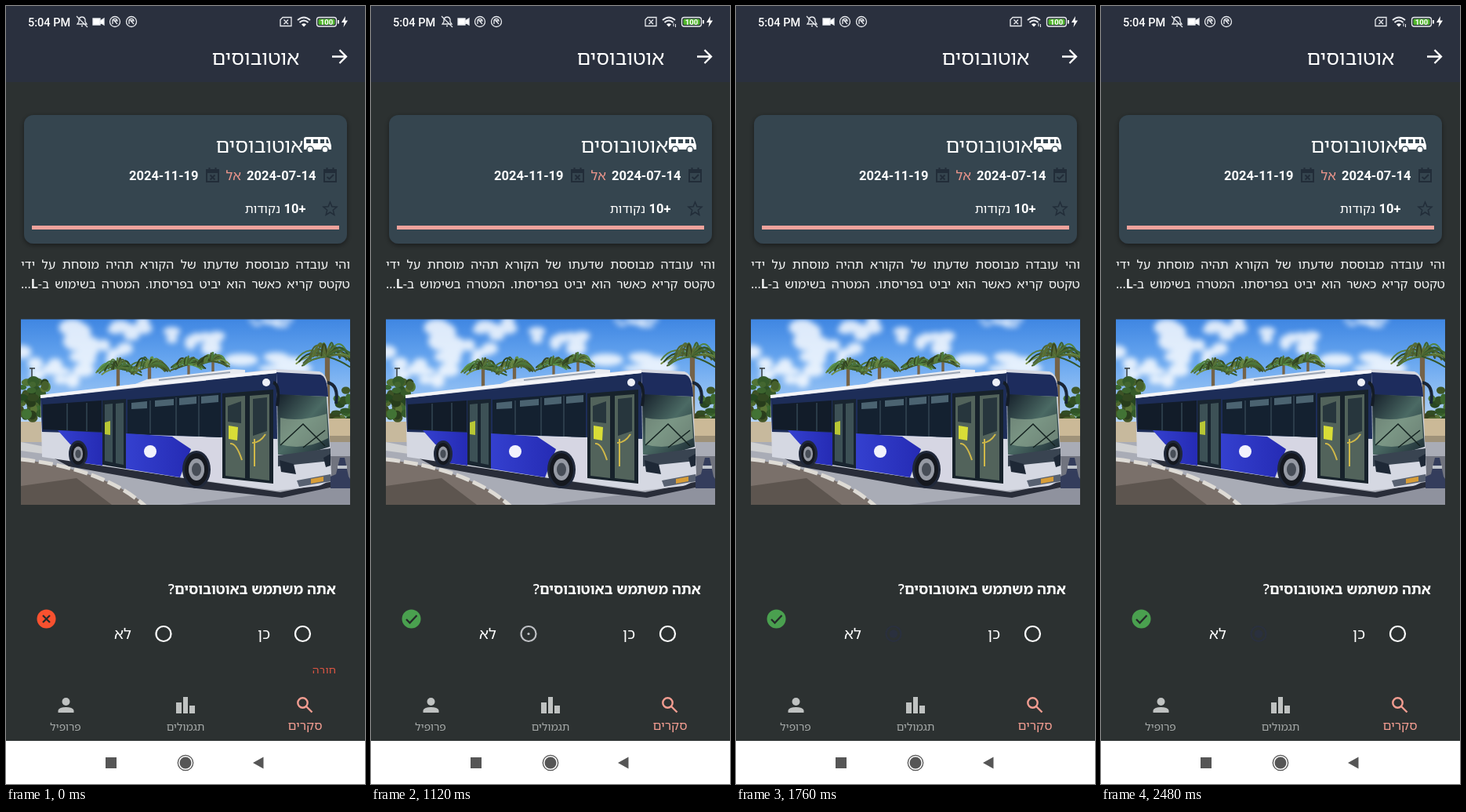
These frames come from a looping animation (458 px wide and 992 px high, 2.56 s). An HTML page:

```html
<!DOCTYPE html>
<html lang="he">
<head>
<meta charset="utf-8">
<style>
html, body { margin: 0; width: 100%; height: 100%; overflow: hidden; background: #2c3131; }
svg { position: absolute; left: 0; top: 0; }
text { font-family: "Noto Sans Hebrew", "Open Sans", "Noto Sans", sans-serif; fill: #fff; }
.he { direction: rtl; }
.mid { text-anchor: middle; }
.num { font-family: Roboto, sans-serif; font-weight: 700; }
.para { position: absolute; left: 19px; width: 420px; top: 317px; direction: rtl; color: #f4f5f5;
  font: 500 16px/25px "Noto Sans Hebrew", "Open Sans", "Noto Sans", sans-serif; }
.para div { white-space: nowrap; text-align: justify; text-align-last: justify; }
</style>
</head>
<body>
<svg width="458" height="992" viewBox="0 0 458 992">
  <defs>
    <linearGradient id="sky" x2="0" y2="1"><stop stop-color="#3f86e2"/><stop offset=".35" stop-color="#6aa8f0"/><stop offset="1" stop-color="#d3e5f8"/></linearGradient>
    <linearGradient id="glass" x2="1" y2="1"><stop stop-color="#16202b"/><stop offset=".5" stop-color="#4b6a64"/><stop offset="1" stop-color="#1b2a33"/></linearGradient>
    <linearGradient id="blue" x2="1"><stop stop-color="#3440cf"/><stop offset="1" stop-color="#252bb4"/></linearGradient>
    <filter id="soft"><feGaussianBlur stdDeviation="3.5"/></filter>
    <filter id="shade" x="-10%" y="-10%" width="120%" height="125%"><feDropShadow dx="0" dy="2" stdDeviation="3" flood-opacity=".45"/></filter>
    <clipPath id="photo"><rect x="19" y="399.5" width="420" height="236.5"/></clipPath>
    <clipPath id="page"><rect width="458" height="851"/></clipPath>
  </defs>

  <!-- status bar and title -->
  <rect width="458" height="97" fill="#2a303e"/>
  <text class="num" x="28" y="25.500" font-size="14.500" style="font-weight:500">5:04 PM</text>
  <g fill="none" stroke="#e8eaee" stroke-width="1.300">
    <path d="M91 23H103L101 20V17Q100 14 97 14Q94 14 93 17V20ZM96 25.500H98M90 13L104 27"/>
    <path d="M111 16H120V24H111ZM120 19L125 16V24L120 21Z" fill="#fff"/>
    <g id="rings"><circle cx="139" cy="20" r="6.500"/><path d="M136 20A3 3 0 0 1 142 19L138 18.500L142 23M136 23V20"/></g>
    <use href="#rings" x="21"/>
    <path d="M353 14.500H364V25.500H350V17.500ZM354.500 17.500L360 23M360 17.500L354.500 23"/>
    <path d="M372 18Q380 11 388 18M374.500 21Q380 16 385.500 21" stroke-width="2"/>
    <path d="M377 23.500Q380 21 383 23.500L380 26.500Z" fill="#fff" stroke="none"/>
    <path id="net" d="M386 22V26M388.500 23V27" stroke-width="1"/>
    <rect x="396.500" y="14.500" width="25" height="11.500" rx="3"/>
    <path d="M424 18V22.500" stroke-width="2"/>
  </g>
  <rect x="398.500" y="16.500" width="21" height="7.500" rx="1.500" fill="#52b72e"/>
  <text class="num mid" x="409" y="23.800" font-size="9.500">100</text>
  <path d="M433 13L428 21H431.500L430.500 27L436 18.500H432.500Z" fill="#fff"/>
  <text class="he" x="374.500" y="75" font-size="26">אוטובוסים</text>
  <path d="M416 64.500H433M425.500 56L434 64.500L425.500 73" fill="none" stroke="#fff" stroke-width="2.300"/>

  <!-- card -->
  <rect x="23" y="139" width="412" height="164" rx="12" fill="#34444f" filter="url(#shade)"/>
  <rect x="33" y="280" width="392" height="5" fill="#f0a29c"/>
  <text class="he" x="379.500" y="187" font-size="26">אוטובוסים</text>
  <path fill="#fff" fill-rule="evenodd" d="M383 167H409Q412 167 413 171L415 178V183H380V170Q380 167 383 167ZM383 170V175H389V170ZM392 170V175H398V170ZM401 170V175H406V170ZM408.500 170V175H412L410.500 170Z"/>
  <g fill="#fff" stroke="#34444f" stroke-width="1.500"><circle cx="388" cy="183" r="4"/><circle cx="407" cy="183" r="4"/></g>
  <text class="num" x="307" y="222" font-size="16.500">2024-07-14</text>
  <text class="num" x="157" y="222" font-size="16.500">2024-11-19</text>
  <text class="he" x="300" y="222" font-size="17" style="fill:#eb958b">אל</text>
  <g fill="none" stroke="#222d39" stroke-width="2">
    <g id="cal"><path d="M406 209H421V224H406ZM409.500 206V210M417.500 206V210"/><path d="M406 211H421" stroke-width="4"/></g>
    <use href="#cal" x="-150"/>
    <path d="M409.500 218L412.500 220.500L418 215M260.500 215.500L266.500 221.500M266.500 215.500L260.500 221.500"/>
    <path id="star" stroke-width="1.500"/>
  </g>
  <text class="num" x="354.500" y="264" font-size="16.500">10+</text>
  <text class="he" x="350" y="264" font-size="16">נקודות</text>

  <!-- photo -->
  <g clip-path="url(#photo)">
    <rect x="19" y="399" width="420" height="160" fill="url(#sky)"/>
    <g id="clouds" fill="#fff" opacity=".82" filter="url(#soft)"></g>
    <path d="M33 462V535M30 462H37" stroke="#343b3c" stroke-width="1.500"/>
    <path d="M19 530H439V560H19Z" fill="#c7b99d"/>
    <g id="bush"></g>
    <g id="palms" fill="none" stroke-linecap="round"></g>
    <path d="M408 526H439V566H408Z" fill="#cbb997"/>
    <path d="M405 548H439V574H405Z" fill="#9f9279"/>
    <path d="M19 556H439V636H19Z" fill="#a9acb6"/>
    <path d="M19 556L70 566V574L19 567Z" fill="#d0d1d2"/>
    <path d="M410 574H439V606H410Z" fill="#71747f"/>
    <path d="M19 578Q125 592 178 636H19Z" fill="#7a706a"/>
    <path d="M19 612L90 602L135 636H19Z" fill="#5d554f"/>
    <path d="M19 578Q125 590 178 638" fill="none" stroke="#dedbd5" stroke-width="5" stroke-dasharray="18 5"/>
    <path d="M220 636L439 608V636Z" fill="#8f929e"/>
    <path d="M60 576L240 604L350 620L418 606V613L352 627L225 613L80 587Z" fill="#292d39"/>

    <!-- bus -->
    <path d="M44 497L165 482L345 463L400 466Q409 469 410 483L415 596Q413 608 398 612L346 618L228 602L46 575Z" fill="#d5d8e2"/>
    <path d="M44 500L165 487L345 468L346 552L46 543Z" fill="#1d2d58"/>
    <path d="M165 482L180 476L290 463L305 464V469Z" fill="#e9ebf0"/>
    <path d="M195 477L286 467" stroke="#99a3b2" stroke-width="2"/>
    <path d="M44 498L165 484L345 466" fill="none" stroke="#f4f5f9" stroke-width="4"/>
    <path d="M47 508L122 503V543L47 540Z" fill="#121c29"/>
    <path d="M155 502L274 493V550L155 545Z" fill="#142130"/>
    <path d="M160 506L180 504V513L160 514ZM190 503L214 501V509L190 511ZM221 500L243 498V507L221 509ZM249 498L271 496V505L249 507Z" fill="#4b6371"/>
    <path d="M78 507V541M103 506V542M184 503V545M217 499V548M246 497V549" stroke="#334553" stroke-width="1.500"/>
    <path d="M66 541L123 544V586L101 583L96 566L82 559Z" fill="url(#blue)"/>
    <path d="M153 545L212 549L236 565L222 601L153 590Z" fill="url(#blue)"/>
    <path d="M213 549L275 551V607L256 605L240 565Z" fill="#d6d6e3"/>
    <path d="M123 503L153 501V590L123 585Z" fill="#192530"/>
    <path d="M126 508L136 507V582L126 580ZM140 507L150 506V585L140 583Z" fill="#3d5156"/>
    <path d="M276 494L341 489V609L276 602Z" fill="#17222b"/>
    <path d="M280 499L305 497V602L280 599ZM311 497L336 495V605L311 602Z" fill="#52635b"/>
    <path d="M283 510L300 504V532L283 530ZM315 501L333 499V542L315 548Z" fill="#27363d"/>
    <path d="M284 535L296 537L295 554L284 552Z" fill="#d8dd37"/>
    <path d="M126 531L133 529V547L126 546Z" fill="#b8c735"/>
    <path d="M286 558Q294 557 301 579M314 557Q324 557 331 546M317 552V587" fill="none" stroke="#d0b848" stroke-width="2"/>
    <path d="M345 467L401 470Q410 472 411 498L346 496Z" fill="#1d2c5d"/>
    <path d="M346 495L409 498L413 562L380 572L347 572Z" fill="url(#glass)"/>
    <path d="M350 525Q374 531 409 520L411 551Q379 568 350 559Z" fill="#9bb49c" opacity=".6"/>
    <path d="M350 560L379 533L407 561M379 563L407 541" fill="none" stroke="#13211f" stroke-width="1.500"/>
    <path d="M347 573L414 564V580L347 587Z" fill="#394451"/>
    <path d="M349 579L367 584L370 597L351 594ZM405 576L414 571V586L408 588Z" fill="#1e2836"/>
    <path d="M371 605L414 597V606L374 613Z" fill="#586171"/>
    <path d="M389 603L405 600V606L389 609Z" fill="#d69c38"/>
    <path d="M341 480Q350 483 346 510" fill="none" stroke="#141c26" stroke-width="4"/>
    <path d="M410 480Q425 483 421 507" fill="none" stroke="#192536" stroke-width="4"/>
    <circle cx="332" cy="480" r="5" fill="#edf0f7"/>
    <circle cx="184" cy="568" r="8" fill="#f2f3fc"/>
    <g id="wheels"></g>
    <path d="M414 600L421 597L426 576H432L437 600L439 603V615H414Z" fill="#343d5c"/>
    <path d="M423 588H435" stroke="#bfc4cb" stroke-width="4"/>
  </g>

  <!-- question -->
  <text class="he" x="421" y="750" font-size="18" font-weight="600">אתה משתמש באוטובוסים?</text>
  <text class="he" x="337" y="807" font-size="19">כן</text>
  <text class="he" x="160" y="807" font-size="19">לא</text>
  <circle cx="378.500" cy="800.500" r="9.500" fill="none" stroke="#fff" stroke-width="2.200"/>
  <circle id="ring" cx="201" cy="800.500" r="9.500" fill="none" stroke-width="2.200"/>
  <circle id="dot" cx="201" cy="800.500"/>
  <circle id="badge" cx="51.500" cy="781.500" r="12"/>
  <path id="mark" fill="none" stroke="#252b2b" stroke-width="2.300"/>
  <g clip-path="url(#page)"><text id="must" class="he" x="421" y="852" font-size="14" style="fill:#d95543">חובה</text></g>

  <!-- tabs -->
  <g fill="#bfc2c1">
    <circle cx="76.500" cy="887" r="5"/><path d="M66.500 901V898Q68 894 76.500 894Q85 894 86.500 898V901Z"/>
    <path d="M217 888H224V902H217ZM226 881H232V902H226ZM234 892H241V902H234Z"/>
  </g>
  <g fill="none" stroke="#f39d91" stroke-width="2.400"><circle cx="378.500" cy="888.500" r="6.200"/><path d="M383 893L390.500 900.500"/></g>
  <text class="he mid" x="76" y="924" font-size="14" style="fill:#a5a9a8">פרופיל</text>
  <text class="he mid" x="229" y="924" font-size="14" style="fill:#a5a9a8">תגמולים</text>
  <text class="he mid" x="381.500" y="923" font-size="16" style="fill:#f39d91">סקרים</text>
  <rect y="937" width="458" height="55" fill="#fff"/>
  <g fill="#565656"><path d="M127 958H141V972H127ZM328.500 957.500V972.500L315 965Z"/><circle cx="229" cy="965" r="7.500"/></g>
  <circle cx="229" cy="965" r="9.700" fill="none" stroke="#565656" stroke-width="1.300"/>
</svg>
<div class="para">
  <div>והי עובדה מבוססת שדעתו של הקורא תהיה מוסחת על ידי</div>
  <div>טקטס קריא כאשר הוא יביט בפריסתו. המטרה בשימוש ב-<b>L</b>...</div>
</div>
<script>
const $ = id => document.getElementById(id);
const set = (id, attrs) => { for (const k in attrs) $(id).setAttribute(k, attrs[k]); };
let seed = 7;
const rand = () => (seed = seed * 16807 % 2147483647) / 2147483647;

const oval = (x, y, rx, ry, fill = "inherit") =>
  `<ellipse cx="${x}" cy="${y}" rx="${rx}" ry="${ry}" fill="${fill}"/>`;

function cloud(x, y, w, h) {
  let s = "";
  for (let i = 0; i < 9; i++)
    s += oval(x + (rand() - .5) * w, y + (rand() - .5) * h, w * (.1 + rand() * .12), h * (.2 + rand() * .2));
  return s;
}

function palm(x, y, r) {
  let s = `<path d="M${x} ${y}V545" stroke="#756348" stroke-width="${r / 7}"/>`;
  for (let i = 0; i < 34; i++) {
    const a = Math.PI * (1 + i / 33) + (rand() - .5) * .5, len = r * (.65 + rand() * .4);
    const dx = Math.cos(a) * len, dy = Math.sin(a) * len * .65;
    s += `<path d="M${x} ${y}Q${x + dx * .6} ${y + dy * 1.3} ${x + dx} ${y + dy * .5 + r * .25}"
      stroke="hsl(${78 + rand() * 30} 34% ${19 + rand() * 24}%)" stroke-width="2"/>`;
  }
  return s;
}

const wheel = (x, y, rx, ry) => oval(x, y, rx + 3, ry + 3, "#20283a") + oval(x, y, rx, ry, "#15181f") +
  oval(x, y, rx * .67, ry * .67, "#969aa4") + oval(x, y, rx * .4, ry * .4, "#484e58");

$("clouds").innerHTML = [[66, 426, 92, 36], [150, 412, 60, 22], [238, 427, 62, 24], [125, 442, 70, 20],
  [330, 455, 100, 20], [335, 404, 50, 8], [62, 466, 75, 24]].map(c => cloud(...c)).join("");
$("palms").innerHTML = [[143, 462, 30], [183, 460, 30], [233, 457, 23], [264, 453, 24], [410, 447, 44]]
  .map(p => palm(...p)).join("");
let leaves = "";
for (let i = 0; i < 65; i++) {
  const right = i > 42;
  leaves += oval(right ? 417 + rand() * 28 : 17 + rand() * 37, (right ? 490 : 478) + rand() * 48,
    4 + rand() * 4, 3 + rand() * 4, `hsl(${82 + rand() * 30} 37% ${17 + rand() * 18}%)`);
}
$("bush").innerHTML = leaves;
$("wheels").innerHTML = wheel(92, 571, 9, 14) + wheel(243, 591, 15, 21);

let star = "";
for (let i = 0; i < 10; i++) {
  const a = Math.PI * (i / 5 - .5), r = i % 2 ? 4 : 9;
  star += `${i ? "L" : "M"}${413.5 + r * Math.cos(a)} ${259 + r * Math.sin(a)}`;
}
set("star", { d: star + "Z" });

const LOOP = 2560, STEP = 80, TAP = 1060, FADE = 200;
const white = [255, 255, 255], navy = [42, 48, 62];

function draw(now) {
  const t = Math.floor(now % LOOP / STEP) * STEP;
  const done = t >= TAP, p = Math.min(1, Math.max(0, (t - TAP) / FADE));
  const color = `rgb(${white.map((w, i) => Math.round(w + (navy[i] - w) * p))})`;
  set("ring", { stroke: color });
  set("dot", { fill: color, r: 5.3 * p });
  set("badge", { fill: done ? "#4aa04f" : "#f8512f" });
  set("mark", { d: done ? "M45 782L49.500 786.500L58.500 777" : "M47 777L56 786M56 777L47 786" });
  set("must", { visibility: done ? "hidden" : "visible" });
  set("net", { visibility: t >= 800 ? "visible" : "hidden" });
}

const start = performance.now();
(function tick() {
  draw(performance.now() - start);
  requestAnimationFrame(tick);
})();
</script>
</body>
</html>
```
